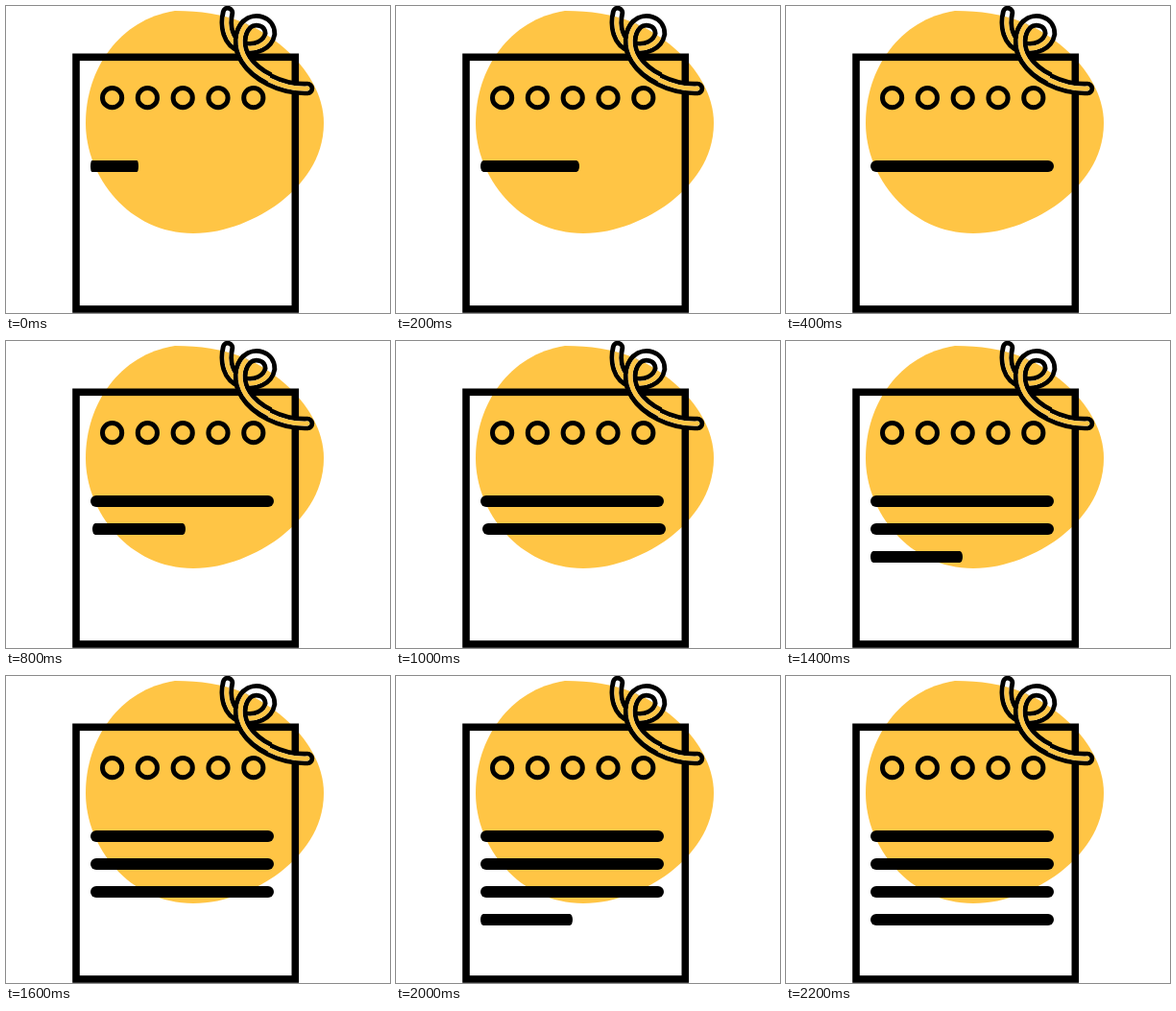
An HTML page with a canvas for the animation above (2400 ms loop, 400 by 320 pixels).

```html
<!DOCTYPE html>
<html lang="en">
<head>
<meta charset="utf-8">
<title>Notepad</title>
<style>
html, body { margin: 0; width: 100%; height: 100%; overflow: hidden; background: #fff; }
canvas { display: block; width: 400px; height: 320px; }
</style>
</head>
<body>
<canvas id="stage" width="400" height="320"></canvas>
<script>
const ctx = document.getElementById('stage').getContext('2d');
const YELLOW = '#ffc545';
const LOOP = 2400, STEP = 200;
const FULL = 191, BAR_H = 12, RADIUS = 6;

const blob = new Path2D(
  'M176 5 C230 5 262 20 290 44 C314 65 331 93 331 122 C331 160 308 187 285 205 ' +
  'C262 222 229 237 195 237 C128 237 83 178 83 122 C83 66 118 14 176 5 Z');

const tail = 'C243 27 241 42 250 56 C260 72 285 87 314 86';
const ribbon = new Path2D(
  'M231 7 C228 20 230 38 246 43 C260 47 273 40 275 29 C275 15 259 12 251 19 ' + tail);
const overpass = new Path2D('M251 19 C243 27 241 42 250 56 C255 64 264 71 274 76');

// Three widths per line: short, half, full
const lines = [
  { y: 161, widths: [50, 103, FULL], shift: [0, 0, 0] },
  { y: 190, widths: [45, 97, FULL], shift: [0, 2, 2] },
  { y: 219, widths: [45, 96, FULL], shift: [0, 0, 0] },
  { y: 248, widths: [43, 96, FULL], shift: [0, 0, 0] }
];

function strokePath(path, color, width, cap) {
  ctx.strokeStyle = color;
  ctx.lineWidth = width;
  ctx.lineCap = cap;
  ctx.stroke(path);
}

// Hollow ribbon: the backdrop shows through, but the page outline does not
function drawRibbon(path, cap) {
  strokePath(path, '#000', 14.5, cap);
  strokePath(path, '#fff', 4.8, cap);
  ctx.save();
  ctx.clip(blob);
  strokePath(path, YELLOW, 4.8, cap);
  ctx.restore();
}

// Bars are stretched sideways, so their corners narrow with them
function drawBar(x, y, w) {
  ctx.save();
  ctx.translate(x, y);
  ctx.scale(w / FULL, 1);
  ctx.beginPath();
  ctx.roundRect(0, 0, FULL, BAR_H, RADIUS);
  ctx.fillStyle = '#000';
  ctx.fill();
  ctx.restore();
}

function drawPage() {
  ctx.fillStyle = '#fff';
  ctx.fillRect(0, 0, 400, 320);
  ctx.fillStyle = YELLOW;
  ctx.fill(blob);

  ctx.strokeStyle = '#000';
  ctx.lineWidth = 7.6;
  ctx.strokeRect(73, 53.3, 228.3, 262.7);

  ctx.lineWidth = 5;
  for (let i = 0; i < 5; i++) {
    ctx.beginPath();
    ctx.arc(110.6 + 36.8 * i, 95.7, 10.1, 0, Math.PI * 2);
    ctx.stroke();
  }

  drawRibbon(ribbon, 'round');
  drawRibbon(overpass, 'butt');
}

function draw(time) {
  const step = Math.floor((time % LOOP) / STEP);
  drawPage();
  lines.forEach((line, i) => {
    const stage = step - i * 3;
    if (stage < 0) return;
    const k = Math.min(stage, 2);
    const shift = stage > 2 ? 0 : line.shift[k];
    drawBar(88 + shift, line.y, line.widths[k]);
  });
}

const start = performance.now();
function tick(now) {
  draw(Math.max(0, now - start));
  requestAnimationFrame(tick);
}
draw(0);
requestAnimationFrame(tick);
</script>
</body>
</html>
```
